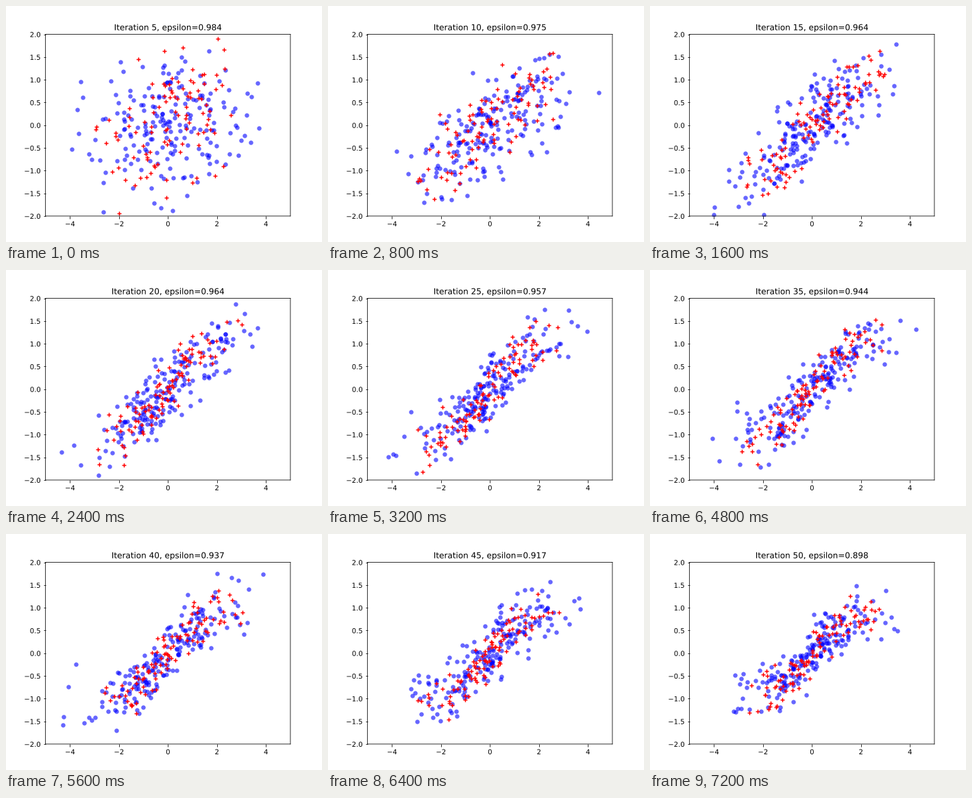
A matplotlib script that plays this animation: 461 by 346 pixels, repeating every 8 s.

```python
import matplotlib.pyplot as plt
import numpy as np
from matplotlib.animation import FuncAnimation
from matplotlib.patheffects import Normal

DPI = 72
N_BLUE, N_RED = 200, 100
STEPS = range(5, 51, 5)

# The reported tolerance is interpolated between these iterations.
EPSILON_STEPS = [5, 10, 15, 20, 30, 40, 50]
EPSILON = [0.984, 0.975, 0.964, 0.964, 0.950, 0.937, 0.898]


def settle(step, start, end, pace):
    """Exponential approach from start to end."""
    return end + (start - end) * np.exp((5 - step) / pace)


def bounded_normal(rng, count, limit):
    values = rng.normal(size=4 * count)
    return values[np.abs(values) < limit][:count]


def cloud(rng, count, reach, top, slope, noise):
    """Points scattered around an S-curve that flattens out at +-top."""
    x = 0.05 + 1.55 * bounded_normal(rng, count, reach)
    y = top * np.tanh(slope * x / top)
    y += noise * bounded_normal(rng, count, 2.5)
    return np.column_stack([x, y])


def vector_text(text):
    """Render glyphs as smooth outlines instead of hinted bitmaps."""
    text.set_path_effects([Normal()])


fig, ax = plt.subplots(figsize=(461 / DPI, 346 / DPI), dpi=DPI)
ax.set_xlim(-5, 5)
ax.set_ylim(-2, 2)
blue = ax.scatter([], [], s=42, c="blue", alpha=0.6, linewidths=0)
red = ax.scatter([], [], c="red", marker="+")
title = ax.set_title("")

# Keep everything at sub-pixel positions.
ticks = ax.get_xticklines() + ax.get_yticklines()
for artist in [blue, red, *ax.spines.values(), *ticks]:
    artist.set_snap(False)
for text in [title, *ax.get_xticklabels(), *ax.get_yticklabels()]:
    vector_text(text)


def draw(i):
    step = STEPS[i]
    rng = np.random.default_rng(100 + step)
    top = 2 - 1.1 * (step - 5) / 45
    blue.set_offsets(cloud(rng, N_BLUE, 2.9, top,
                           slope=settle(step, 0.02, 0.60, 7),
                           noise=settle(step, 0.79, 0.34, 9)))
    red.set_offsets(cloud(rng, N_RED, 1.95, top,
                          slope=settle(step, 0.35, 0.72, 10),
                          noise=settle(step, 0.78, 0.26, 6)))
    epsilon = np.interp(step, EPSILON_STEPS, EPSILON)
    title.set_text(f"Iteration {step}, epsilon={epsilon:.3f}")
    return blue, red, title


anim = FuncAnimation(fig, draw, frames=len(STEPS), interval=800,
                     init_func=lambda: draw(0), repeat=True, repeat_delay=0)
plt.show()
```
